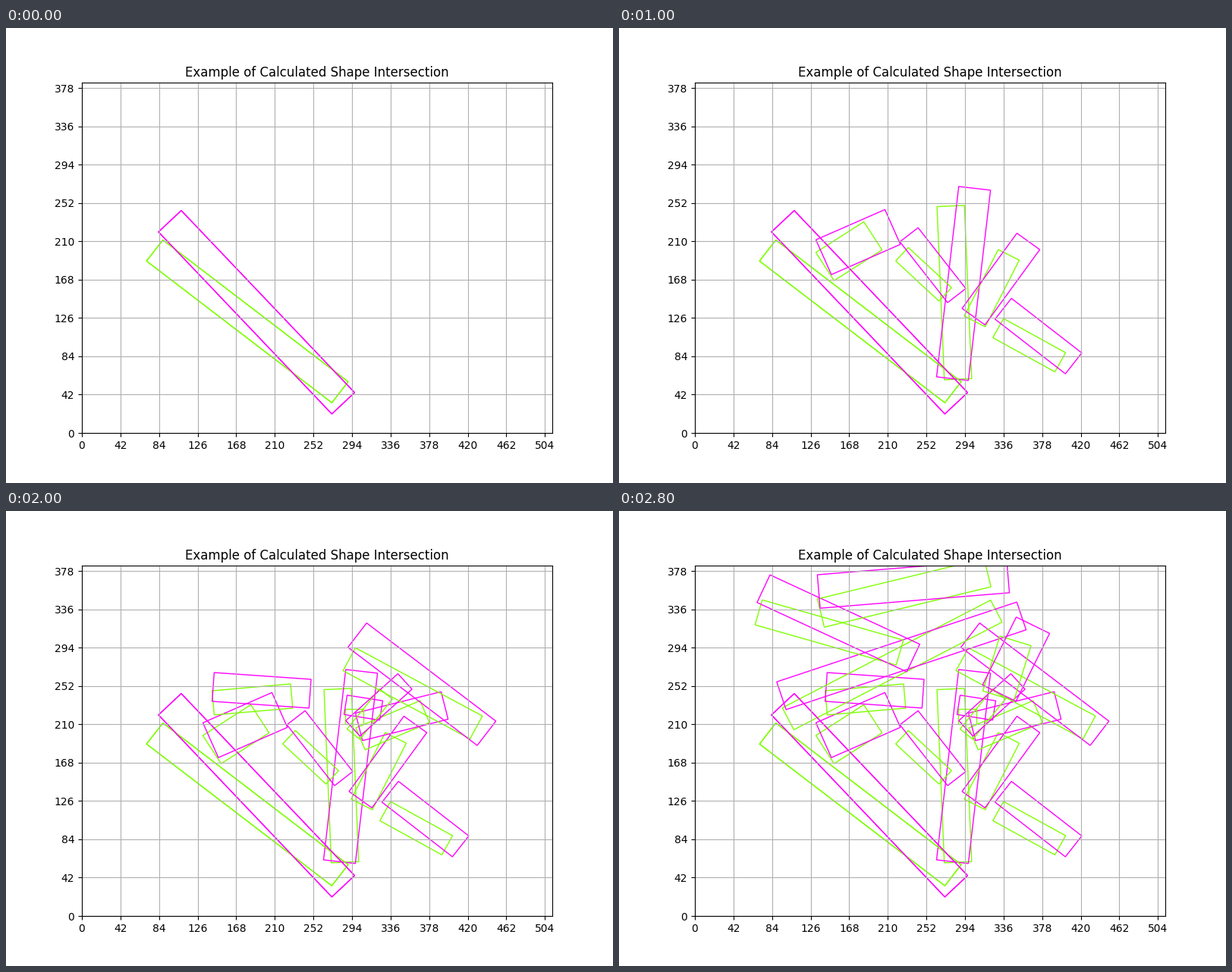
Recreate the animation shown at these times as a matplotlib script. Size 800 px wide and 600 px high, loop 3 s.

```python
import matplotlib.pyplot as plt
import numpy as np
from matplotlib.animation import FuncAnimation
from matplotlib.patches import Rectangle

WIDTH, HEIGHT = 512, 384
TICK = 42
INTERVAL = 200

# How a magenta box follows from its green partner.
SHIFT = 10
GROW_LONG, GROW_SHORT = 20, 5
TURN = -9

# Green boxes from bottom to top: centre x, centre y, length, breadth, angle.
BOXES = [
    (180.1, 122.3, 254.6, 29.1, -37.6),
    (363.9, 96.2, 77.2, 24.0, -29.0),
    (282.4, 153.8, 190.0, 29.8, 92.4),
    (323.1, 158.7, 81.8, 25.7, 63.1),
    (167.7, 199.2, 62.1, 36.7, 32.8),
    (249.0, 173.9, 64.5, 20.1, -43.1),
    (338.2, 209.0, 76.1, 26.1, 23.1),
    (185.6, 237.3, 85.7, 26.6, 5.0),
    (296.4, 218.3, 19.2, 16.5, 0.0),
    (313.3, 221.3, 56.5, 17.9, 51.2),
    (360.1, 244.0, 157.1, 28.5, -28.4),
    (214.8, 275.1, 255.5, 27.1, 27.5),
    (339.6, 271.4, 63.0, 35.5, 72.8),
    (146.2, 310.7, 159.8, 28.4, -16.0),
    (227.8, 354.1, 186.7, 31.8, 13.7),
]

plt.rcParams["text.kerning_factor"] = 6

fig, ax = plt.subplots(figsize=(8, 6), dpi=100)
ax.set_xlim(0, WIDTH)
ax.set_ylim(0, HEIGHT)
ax.set_xticks(np.arange(0, WIDTH, TICK))
ax.set_yticks(np.arange(0, HEIGHT, TICK))
ax.grid(True)
ax.set_title("Example of Calculated Shape Intersection")


def outline(cx, cy, w, h, angle, color):
    return ax.add_patch(Rectangle(
        (cx - w / 2, cy - h / 2), w, h, angle=angle, rotation_point="center",
        fill=False, edgecolor=color, linewidth=1, visible=False))


def add_pair(cx, cy, w, h, angle):
    return [
        outline(cx, cy, w, h, angle, "chartreuse"),
        outline(cx + SHIFT, cy + SHIFT, w + GROW_LONG, h + GROW_SHORT,
                angle + TURN, "magenta"),
    ]


# The first pair is laid down twice, which makes its lines look heavier.
pairs = [add_pair(*box) for box in BOXES]
pairs[0] += add_pair(*BOXES[0])


def update(frame):
    for i, pair in enumerate(pairs):
        for patch in pair:
            patch.set_visible(i <= frame)
    return sum(pairs, [])


anim = FuncAnimation(fig, update, frames=len(pairs), interval=INTERVAL,
                     repeat=True, repeat_delay=0, blit=False)
plt.show()
```
